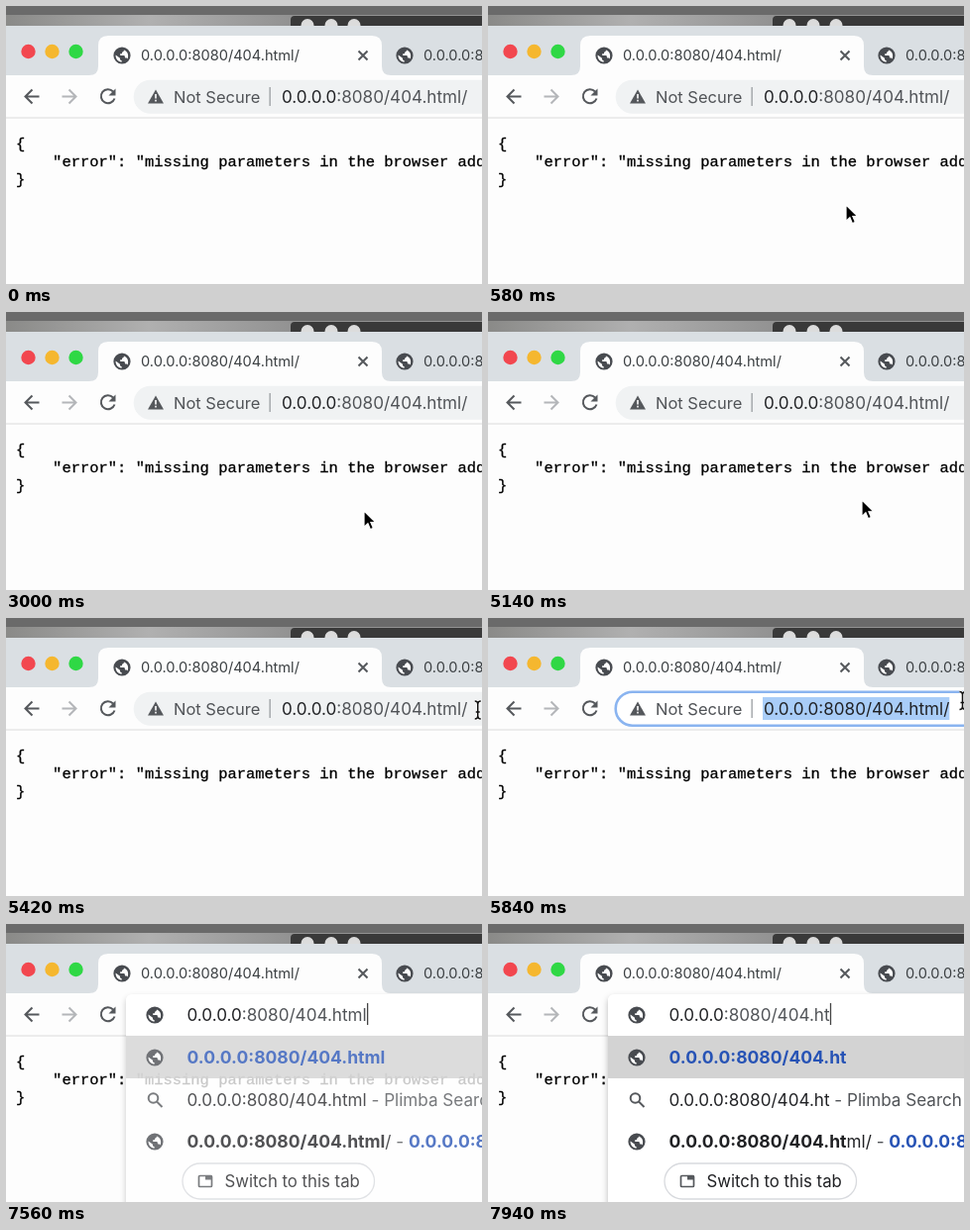
Recreate the animation shown at these times as an HTML page. Size 480x281 px, loop 8 s.

```html
<!DOCTYPE html>
<html lang="en">
<head>
<meta charset="utf-8">
<style>
  html, body { margin: 0; width: 100%; height: 100%; overflow: hidden; background: #fff; }
  svg { display: block; width: 480px; height: 281px; }
  text { font: 17.1px Inter, Roboto, sans-serif; font-optical-sizing: none; white-space: pre; fill: #202124; }
  .tab { font-size: 14.6px; fill: #3c4043; }
  .mono { font: 15.47px "Liberation Mono", monospace; fill: #000; stroke: #000; stroke-width: .3; }
  .dim { fill: #505357; }
  .bold, .blue { font-weight: 700; font-size: 17.55px; }
  .blue { fill: #2753b5; }
  .line { fill: none; stroke: #55585c; stroke-width: 2; }
</style>
</head>
<body>
<svg viewBox="0 0 480 281">
  <defs>
    <linearGradient id="sky">
      <stop offset="0" stop-color="#8a8a88"/>
      <stop offset=".3" stop-color="#b0b0b0"/>
      <stop offset=".6" stop-color="#929292"/>
    </linearGradient>
    <g id="globe">
      <circle r="8.6" fill="#484b50"/>
      <path fill="#fff" d="M-6.4-.6L-2 2.800v1.400l1.800 1.400v1C-4 6.400-6.800 3-6.400-.6zM2-5.600C2-3.600.4-4 0-3v1.200h-1.800V0H2.400l.8 2.400h1.600l.8 1C6.800.6 6.400-4 2-5.600z"/>
    </g>
    <path id="ibeam" d="M-3-9q3 0 3 3V6q0 3-3 3M3-9q-3 0-3 3M3 9q-3 0-3-3M-2 2h4"/>
  </defs>

  <!-- desktop and the window behind -->
  <rect width="480" height="24" fill="url(#sky)"/>
  <rect width="480" height="9" fill="#6a6a6a"/>
  <path d="M287 24V14q0-4 4-4H480V24z" fill="#393939"/>
  <g fill="#dcdcdc"><circle cx="304" cy="19.500" r="6.500"/><circle cx="328" cy="19.500" r="6.500"/><circle cx="351" cy="19.500" r="6.500"/></g>

  <!-- browser -->
  <rect y="20" width="480" height="51" fill="#dadfe3"/>
  <rect y="70" width="480" height="211" fill="#fdfdfd"/>
  <path d="M84 70q9 0 9-9V40q0-10 10-10H369q10 0 10 10V61q0 9 9 9z" fill="#fdfdfd"/>
  <circle cx="22.500" cy="46" r="7.200" fill="#f2474f"/>
  <circle cx="46.500" cy="46" r="7.200" fill="#f5b72f"/>
  <circle cx="70.500" cy="46" r="7.200" fill="#2fd845"/>
  <use href="#globe" x="117" y="50"/>
  <text class="tab" x="136" y="55">0.0.0.0:8080/404.html/</text>
  <path class="line" d="M355.500 45.500l9 9m0-9l-9 9"/>
  <use href="#globe" x="402" y="50"/>
  <text class="tab" x="421" y="55">0.0.0.0:8080/404.html/</text>
  <path class="line" d="M33.500 91.500H19.500m7-7l-7 7 7 7"/>
  <path class="line" style="stroke:#b4b6b9" d="M56.500 91.500H70.500m-7-7l7 7-7 7"/>
  <path class="line" d="M108 86.500A7 7 0 1 0 109.500 93.500"/>
  <path d="M110.500 83.500v7h-7z" fill="#55585c"/>
  <rect y="112.500" width="480" height="1" fill="#dcdcdc"/>

  <!-- address bar -->
  <rect id="pill" x="128.700" y="74.700" width="400" height="34" rx="17"/>
  <path d="M151 84.500l8 14h-16z" fill="#55585c"/>
  <path d="M151 89v4.500m0 1.300v1.800" stroke="#fff" stroke-width="1.600"/>
  <text class="dim" x="169" y="97.600" style="font-size:16.500px">Not Secure</text>
  <rect x="265.500" y="82" width="1.300" height="19" fill="#9a9da1"/>
  <rect id="mark" x="277" y="80" height="23" fill="#a9cdf8"/>
  <text id="url" x="278" y="97.600">0.0.0.0<tspan id="path" class="dim">:8080/404.html/</tspan></text>

  <text class="mono" x="10" y="144">{</text>
  <text class="mono" x="47.100" y="162">"error": "missing parameters in the browser address"</text>
  <text class="mono" x="10" y="180">}</text>

  <!-- suggestions -->
  <g id="drop">
    <path id="panel" d="M121 300V78q0-7 7-7H500V300z" fill="#fff" style="filter:drop-shadow(0 3px 3px #0004)"/>
    <path d="M121 112.500V78q0-7 7-7H480V112.500z" fill="#fff"/>
    <use href="#globe" x="150" y="92"/>
    <text id="typed" x="182.500" y="97.600">0.0.0.0<tspan class="dim" data-part="rest"></tspan></text>
    <g id="rows">
      <rect x="121" y="113" width="359" height="43" fill="#d3d3d3"/>
      <use href="#globe" x="150" y="135"/>
      <text class="blue" x="182.500" y="140.600">0.0.0.0<tspan data-part="rest"></tspan></text>
      <circle class="line" cx="148.500" cy="176" r="4.800"/>
      <path class="line" d="M152 179.500l5.500 5.500"/>
      <text x="182.500" y="183.600">0.0.0.0<tspan data-part="rest"></tspan><tspan class="dim"> - Plimba Search</tspan></text>
      <use href="#globe" x="150" y="220"/>
      <text x="182.500" y="226.100"><tspan class="bold">0.0.0.0<tspan data-part="rest"></tspan></tspan><tspan data-part="tail"></tspan><tspan class="dim"> - </tspan><tspan class="blue">0.0.0.0:8080/404.html/</tspan></text>
      <rect x="178" y="242" width="193.500" height="36" rx="18" fill="#fff" stroke="#d8dade" stroke-width="1.300"/>
      <rect class="line" x="194.500" y="254.500" width="13" height="11" rx="1" style="stroke-width:1.700"/>
      <rect x="201" y="254" width="6.500" height="4.500" fill="#55585c"/>
      <text x="220.500" y="266" style="font-size:16.750px">Switch to this tab</text>
    </g>
  </g>

  <rect id="caret" y="80" width="1.300" height="22" fill="#444"/>
  <path id="arrow" d="M0 0V16.500l3.900-3.700 2.500 5.900 3-1.300-2.500-5.700h5z" fill="#000" stroke="#fff" stroke-width="1.200"/>
  <g id="beam" fill="none">
    <use href="#ibeam" stroke="#fff" stroke-width="3"/>
    <use href="#ibeam" stroke="#111" stroke-width="1.500"/>
  </g>
</svg>
<script>
const LOOP = 8000, STEP = 20;
const $ = id => document.getElementById(id);
const show = (id, on) => $(id).style.display = on ? '' : 'none';
const place = (id, x, y) => $(id).setAttribute('transform', `translate(${x} ${y})`);
const ramp = (t, a, b) => Math.min(1, Math.max(0, (t - a) / (b - a)));
const easeOut = (p, n) => 1 - (1 - p) ** n;
const mix = (a, b, p) => a + (b - a) * p;
const fill = (part, s) => document.querySelectorAll(`[data-part=${part}]`).forEach(e => e.textContent = s);

// Pointer hotspot, or null while it is off the stage
function pointer(t) {
  if (t < 5140) {
    const s = t % 2420;
    if (s < 460) return null;
    const p = easeOut(ramp(s, 440, 580), 2);
    return [mix(392, 361, p), mix(285, 201, p)];
  }
  if (t >= 6740) return null;
  const p = ramp(t, 5120, 5540);
  return [
    mix(361, 478.5, easeOut(p, 3)) + 7 * ramp(t, 6620, 6740),
    mix(201, 83.5, easeOut(p, 2)) + 3 * ramp(t, 5840, 6040) + 2 * ramp(t, 6420, 6500)
  ];
}

function draw(t) {
  const focused = t >= 5700, selected = t >= 5840 && t < 6440, open = t >= 7500;

  const pill = $('pill');
  pill.setAttribute('fill', focused ? '#fff' : '#f0f2f3');
  pill.setAttribute('stroke', focused ? '#8ab4f0' : 'none');
  pill.setAttribute('stroke-width', 2.6);
  show('mark', selected);
  $('path').style.fill = selected ? '#202124' : '';

  const size = t < 7920 ? 4 : t < 7940 ? 3 : 2;
  fill('rest', ':8080/404.' + 'html'.slice(0, size));
  fill('tail', 'html/'.slice(size));
  show('drop', open);
  const fade = easeOut(ramp(t, 7480, 7680), 3);
  $('panel').style.opacity = $('rows').style.opacity = fade;

  const field = $(open ? 'typed' : 'url');
  const width = field.getComputedTextLength();
  $('mark').setAttribute('width', width + 1);
  $('caret').setAttribute('x', +field.getAttribute('x') + width + .3);
  show('caret', focused && !selected && (t < 7100 || open));

  const pos = pointer(t), overField = pos && pos[1] < 109;
  show('arrow', pos && !overField);
  show('beam', overField);
  if (pos) place(overField ? 'beam' : 'arrow', ...pos);
}

const start = performance.now();
function tick() {
  const t = (performance.now() - start) % LOOP;
  draw(Math.floor(t / STEP) * STEP);
  requestAnimationFrame(tick);
}
tick();
</script>
</body>
</html>
```
